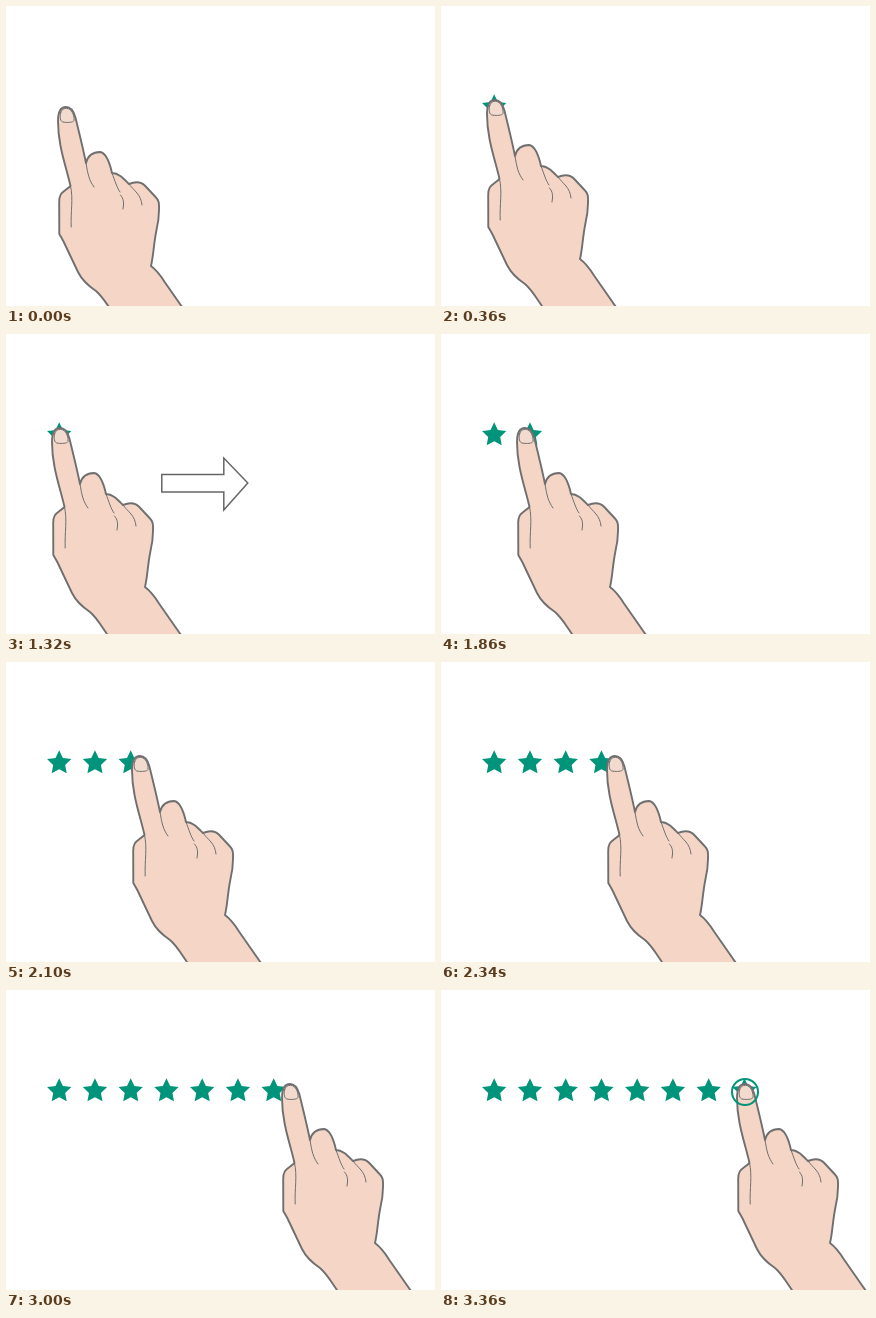
These frames come from a looping animation (429 px wide and 300 px high, 3.48 s). An HTML page:

```html
<!DOCTYPE html>
<html lang="en">
<head>
<meta charset="utf-8">
<title>Drag to rate</title>
<style>
  html, body { margin: 0; width: 100%; height: 100%; overflow: hidden; background: #fff; }
  svg { display: block; }
  path { stroke-linejoin: round; stroke-linecap: round; }
</style>
</head>
<body>
<svg width="429" height="300" viewBox="0 0 429 300">
  <g id="stars" fill="#00957a"></g>
  <path id="arrow" d="M0 140.5H62V124L86 149L62 176V158H0Z" fill="#fff" stroke="#666" stroke-width="1.5"
        style="stroke-linejoin: miter"/>
  <g id="hand" fill="none" stroke="#6f6f6f">
    <path fill="#f5d5c6" stroke-width="1.9" d="M58.5 173
      C54 153 46 133 46 108 C46 99 49 94 54 94 C59 94 61.5 98 63.3 104
      C67 119 71 135 74 150 C76 142 81 139 88 139 C95 140 98 151 100 160
      C107 160 112 166 117 171 C122 169 128 167.5 133.3 173 L144 184.5
      C147 187.5 147.2 190 147 197 C147 205 146 211 144.3 218 C141.5 232 141.5 243 139 253
      C145 257.5 149 263 153 269.5 L174.3 300 L182 312 H110 L101 300
      C96 293 91 284 84 278 C75 272 70 267 66 259 L51.3 228 L47.3 221
      L47.2 190 C47 179 51 179.5 58.5 173Z"/>
    <path stroke-width="1" d="M58.5 173 C61.5 186 58.5 198 59.2 214 M74 150 C76 162 77 167 82 174
      M100 160 C103 168 105 175 108 179 M108.5 182 C112 186 112 190 111 196
      M117 171 C122 178 129 181 130 192"/>
    <path fill="#f2dace" stroke-width="1" d="M48.6 100 C47.6 104 48 109 52 109.2
      C56 109.7 61 109.5 62 107.5 C62.5 103 60 95.5 54.5 95.3 C51 95.3 49.3 97 48.6 100Z"/>
  </g>
  <circle id="ring" cx="304" cy="102" fill="none" stroke="#00957a" stroke-width="2"/>
</svg>
<script>
const TICK = 60, LOOP = 3480, GAP = 35.75;
const [stars, arrow, hand, ring] = ["stars", "arrow", "hand", "ring"].map(id => document.getElementById(id));

function starPath(cx, cy) {
  const points = Array.from({ length: 10 }, (_, i) => {
    const r = i % 2 ? 6.3 : 12.8, a = (i / 5 - 0.5) * Math.PI;
    return (cx + r * Math.cos(a)).toFixed(2) + " " + (cy + r * Math.sin(a)).toFixed(2);
  });
  return "M" + points.join("L") + "Z";
}

for (let i = 0; i < 8; i++) {
  const star = document.createElementNS(stars.namespaceURI, "path");
  star.setAttribute("d", starPath(53.2 + GAP * i, 101));
  stars.append(star);
}

function show(el, on) {
  el.style.visibility = on ? "visible" : "hidden";
}

function draw(now) {
  const step = Math.floor(now % LOOP / TICK);

  // The finger first settles on its spot, then drags right.
  const lift = Math.max(0, 1 - step / 5);
  const drag = Math.min(250, Math.max(0, step - 28) * 10 + (step >= 34 ? 10 : 0));
  hand.setAttribute("transform", `translate(${6 * lift + drag} ${7 * lift})`);

  [...stars.children].forEach((star, i) => show(star, step >= 5 && drag >= GAP * i - 6));

  // Two slides of nine steps, each followed by a two-step pause.
  const slide = (step - 7) % 11;
  show(arrow, step >= 7 && step < 29 && slide < 9);
  arrow.setAttribute("transform", `translate(${144 + 2.95 * slide} 0)`);

  const grow = Math.min(4, step - 52);
  show(ring, grow > 0);
  ring.setAttribute("r", Math.max(0, 1 + 3 * grow));

  requestAnimationFrame(draw);
}
draw(0);
</script>
</body>
</html>
```
